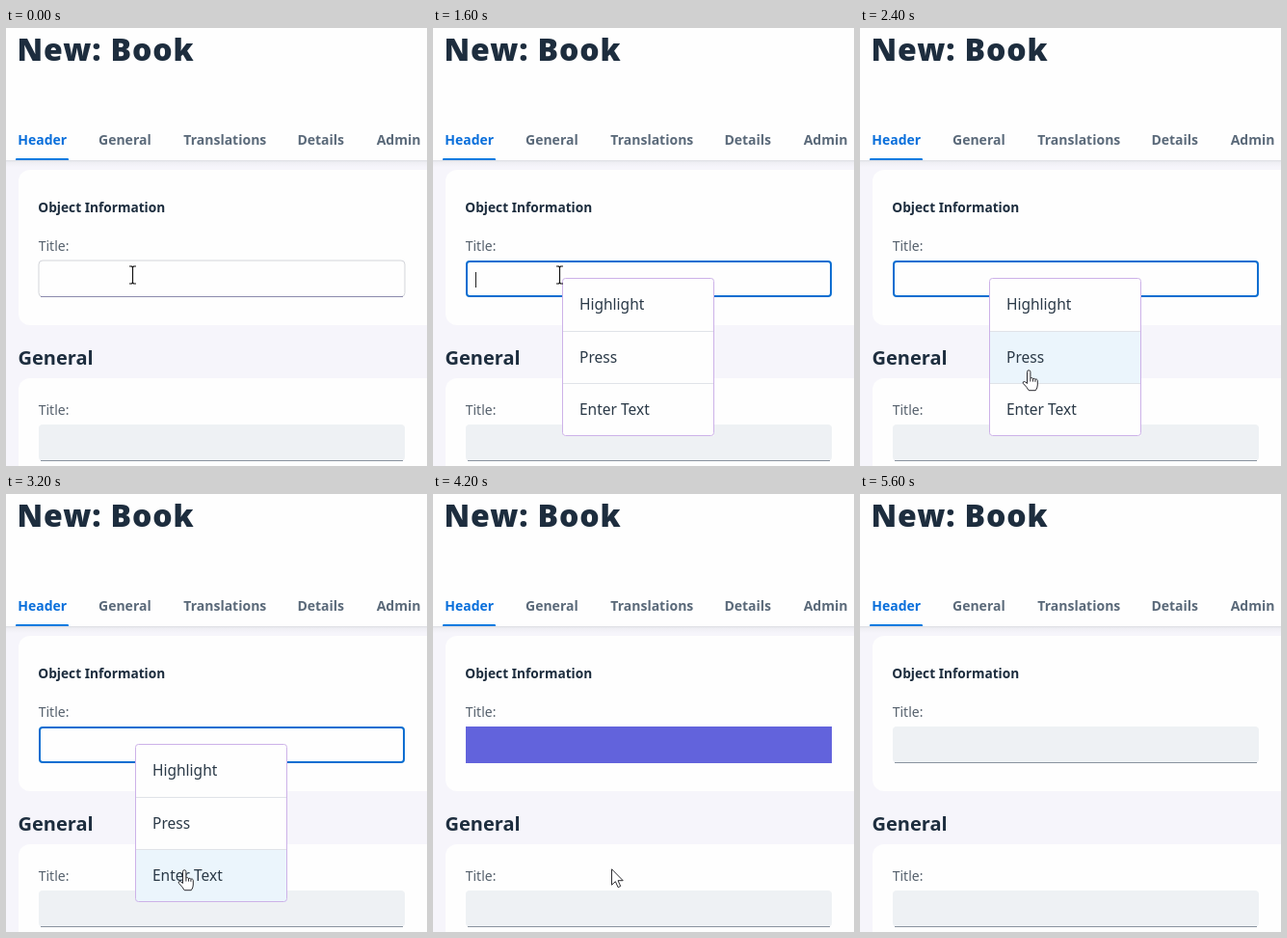
An HTML page that plays this animation: 437x454 px, repeating every 6200 ms.

```html
<!DOCTYPE html>
<html lang="en">
<head>
<meta charset="utf-8">
<title>New: Book</title>
<style>
  html, body { margin: 0; width: 100%; height: 100%; overflow: hidden; background: #f6f5fb; }
  svg { display: block; }
  text { font: 14px "Noto Sans", "Open Sans", sans-serif; fill: #1d2d3e; }
  .title { font: 800 32px "Open Sans", "Noto Sans", sans-serif; letter-spacing: .9px; }
  .tab { font-weight: 700; fill: #5b6a7a; }
  .tab.active { fill: #0a6fdb; }
  .group { font-weight: 700; font-size: 13.7px; }
  .section { font-weight: 700; font-size: 20px; }
  .label { fill: #56616d; }
  .item text { font-size: 15.5px; fill: #2a3947; }
  .item rect { fill: #fefefe; }
  .item.hover rect { fill: #ebf5fc; }
  .plain rect { fill: #eef1f4; }
  .plain path { stroke: #89939f; }
  .hover > .edge { fill: #fefefe; stroke: #d3d5da; }
  .hover > path { stroke: #8c8aac; }
  .focus > .edge { x: 1px; y: 1px; width: 378px; height: 36px; rx: 3px; fill: #fefefe; stroke: #0a6ed1; stroke-width: 2; }
  .focus > path { stroke: none; }
  #cursors path { fill: #fff; stroke: #2b2b30; stroke-linejoin: round; }
  #cursors #beam path { fill: none; stroke: #111; stroke-width: 1.2; }
</style>
</head>
<body>
<svg width="437" height="454" viewBox="0 0 437 454">
  <defs>
    <linearGradient id="shade" x2="0" y2="1">
      <stop stop-color="#dcdde2"/>
      <stop offset=".3" stop-color="#eeeef3"/>
      <stop offset="1" stop-color="#f6f5fb"/>
    </linearGradient>
  </defs>
  <rect width="437" height="454" fill="#f6f5fb"/>
  <rect width="437" height="137" fill="#fefefe"/>
  <rect y="137" width="437" height="7" fill="url(#shade)"/>
  <path d="M10 137v-1q0-1 1-1h53q1 0 1 1v1z" fill="#0a7be0"/>
  <text class="title" x="11.500" y="34">New: Book</text>
  <g id="tabs"></g>

  <rect x="13" y="147" width="450" height="161" rx="12" fill="#fefefe"/>
  <rect x="13" y="363" width="450" height="120" rx="12" fill="#fefefe"/>
  <text class="group" x="33.300" y="191">Object Information</text>
  <text class="label" x="33.700" y="231">Title:</text>
  <text class="section" x="12.500" y="349">General</text>
  <text class="label" x="33.700" y="401">Title:</text>

  <g id="first" transform="translate(34 241)">
    <rect class="edge" width="380" height="37.500" rx="4"/>
    <path d="M2 37.500h376"/>
  </g>
  <g id="second" transform="translate(34 411)">
    <rect class="edge" width="380" height="37.500" rx="4"/>
    <path d="M2 37.500h376"/>
  </g>
  <path id="caret" d="M44.500 253v16" stroke="#222"/>
  <g id="flash">
    <rect x="34" y="241" width="380" height="38"/>
    <path d="M34 241.500h380" stroke="#111"/>
  </g>

  <g id="menu">
    <g id="items"></g>
    <path d="M135 314.500h156M135 368.500h156" stroke="#e0e3e8"/>
    <rect x="134.500" y="259.500" width="157" height="163" rx="3" fill="none" stroke="#cdb2e8"/>
  </g>

  <g id="cursors">
    <g id="beam"><path d="M-3.500-9h2.500l1 1 1-1h2.500M0-8v16M-3.500 9h2.500l1-1 1 1h2.500"/></g>
    <g id="hand">
      <path d="M5.500 14.500V2.500a1.700 1.700 0 0 1 3.400 0V9a1.600 1.600 0 0 1 2.600.6 1.600 1.600 0 0 1 2.400.7 1.500 1.500 0 0 1 2.400 1.200V16q0 3-2 5.700H7.200Q5.500 18.500 1.400 14.500q-.9-2 1-2 1.500.2 3.100 2z"/>
      <path d="M8.900 9v3.500M11.500 9.600v3M13.900 10.300v2.500"/>
    </g>
    <g id="arrow"><path d="M.5.8v16.400l3.900-3.500 2.700 6 2.600-1.200-2.700-5.800h5.200z"/></g>
  </g>
</svg>
<script>
const LOOP = 6200;
const $ = id => document.getElementById(id);

$("tabs").innerHTML = [["Header", 12.2], ["General", 96], ["Translations", 184.3], ["Details", 302.4], ["Admin", 384.7]]
  .map(([name, x], i) => `<text class="tab${i ? "" : " active"}" x="${x}" y="121">${name}</text>`).join("");
$("items").innerHTML = ["Highlight", "Press", "Enter Text"]
  .map((name, i) => `<g class="item" transform="translate(135 ${260 + 54.3 * i})">
    <rect width="156.500" height="54.300"/><text x="17" y="32.300">${name}</text></g>`).join("");

// Each step holds until the next: start, first field, second field, hovered item, flash colour, cursor, x, y
const steps = [
  [0, "hover", "plain", -1, "", "beam", 131.5, 256],
  [1600, "focus", "plain", -1, "", "beam", 131.5, 256],
  [2200, "focus", "plain", 0, "", "hand", 156, 285],
  [2400, "focus", "plain", 1, "", "hand", 168, 354],
  [2600, "focus", "plain", 2, "", "hand", 185, 385],
  [2800, "focus", "plain", 2, "", "hand", 176, 387],
  [3000, "focus", "plain", 2, "", "hand", 178, 389],
  [3600, "plain", "plain", -1, "#9797e5", "arrow", 185, 388],
  [3800, "plain", "plain", -1, "#6263dc", "arrow", 185, 388],
  [5200, "plain", "plain", -1, "", "arrow", 185, 388],
  [5400, "plain", "hover", -1, "", "beam", 190, 417],
  [5600, "plain", "plain", -1, "", "", 0, 0]
];

const show = (node, on) => node.style.display = on ? "" : "none";
const within = (t, from, to) => t >= from && t < to;

function draw(t) {
  const [, first, second, hovered, flash, cursor, x, y] = steps.findLast(s => s[0] <= t);
  $("first").setAttribute("class", first);
  $("second").setAttribute("class", second);
  show($("menu"), first === "focus");
  show($("caret"), within(t, 1600, 2000) || within(t, 2600, 3200));
  [...$("items").children].forEach((item, i) => item.classList.toggle("hover", i === hovered));
  show($("flash"), flash);
  $("flash").setAttribute("fill", flash || "none");
  show($("flash").lastElementChild, t < 3800);
  for (const node of $("cursors").children) show(node, node.id === cursor);
  $("cursors").setAttribute("transform", `translate(${x} ${y})`);
}

const start = performance.now();
function tick() {
  draw((performance.now() - start) % LOOP);
  requestAnimationFrame(tick);
}
tick();
</script>
</body>
</html>
```
